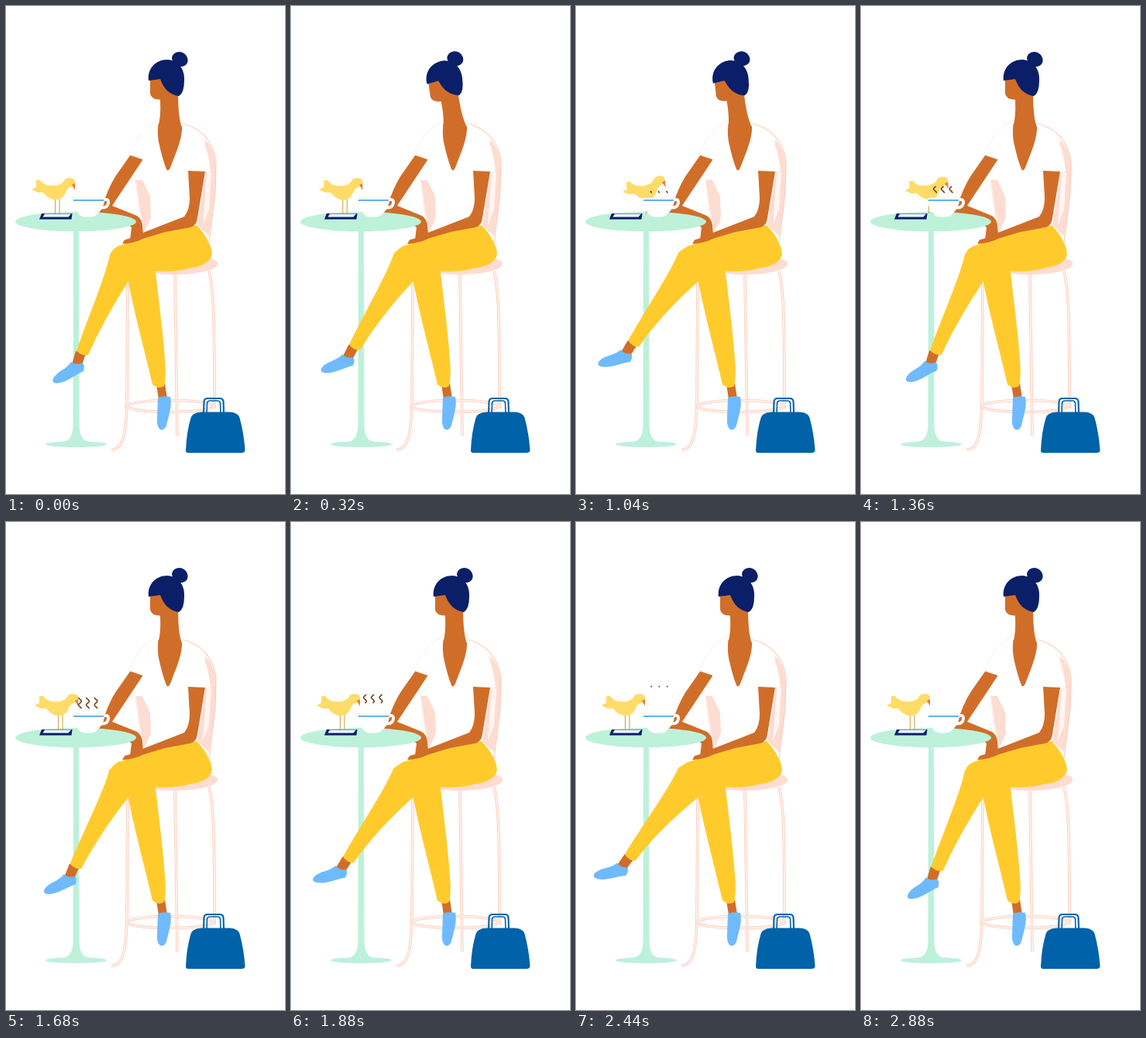
These frames come from a looping animation (360x628 px, 2.92 s). An HTML page with a canvas:

```html
<!DOCTYPE html>
<html lang="en">
<head>
<meta charset="utf-8">
<title>Coffee break</title>
<style>
html, body { margin: 0; width: 100%; height: 100%; overflow: hidden; background: #fff; }
canvas { display: block; width: 360px; height: 628px; }
</style>
</head>
<body>
<canvas id="stage"></canvas>
<script>
const W = 360, H = 628, LOOP = 2920;
const SKIN = '#d06e29', HAIR = '#0a1f68', PANTS = '#ffcb2c', SHOE = '#6fbaff';
const PINK = '#fddcd1', EDGE = '#fbcdbd', MINT = '#bdf1da', BIRD = '#ffdb68';

const canvas = document.getElementById('stage');
const ratio = window.devicePixelRatio || 1;
canvas.width = W * ratio;
canvas.height = H * ratio;
const ctx = canvas.getContext('2d');

function fill(d, color) {
  ctx.fillStyle = color;
  ctx.fill(new Path2D(d));
}

function line(d, color, width) {
  ctx.strokeStyle = color;
  ctx.lineWidth = width;
  ctx.stroke(new Path2D(d));
}

function oval(x, y, rx, ry, color) {
  ctx.fillStyle = color;
  ctx.beginPath();
  ctx.ellipse(x, y, rx, ry, 0, 0, Math.PI * 2);
  ctx.fill();
}

function turned(x, y, deg, draw) {
  ctx.save();
  ctx.translate(x, y);
  ctx.rotate(deg * Math.PI / 180);
  ctx.translate(-x, -y);
  draw();
  ctx.restore();
}

// Returns a function that rotates a point about a pivot, as path text
function spinner(px, py, deg) {
  const c = Math.cos(deg * Math.PI / 180), s = Math.sin(deg * Math.PI / 180);
  return (x, y) => {
    const dx = x - px, dy = y - py;
    return `${px + dx * c - dy * s} ${py + dx * s + dy * c} `;
  };
}

// Sine ease from 0 to 1 between two times
function ease(t, from, to) {
  const u = Math.min(1, Math.max(0, (t - from) / (to - from)));
  return (1 - Math.cos(Math.PI * u)) / 2;
}

function rod(d) {
  line(d, EDGE, 3.6);
  line(d, '#fff3ee', 1.8);
}

function chair() {
  fill('M257 172 C267 182 271 196 271 212 L269 250 L262 296 L247 282 L258 213 Z', PINK);
  fill('M259 214 L265 214 L262 262 L254 282 Z', '#fff5f1');
  fill('M168 224 L176 224 L188 246 L188 276 L179 291 L173 262 Z', PINK);
  line('M167 222 L172 262 L178 291 M165 180 C172 166 182 153 196 148', '#fde6de', 1);
  line('M226 151 C250 156 267 172 271 200 L270 240 L262 305', EDGE, 1.2);
  rod('M157 350 L156 510 C155 545 153 571 136 571');
  rod('M218 345 L221 553');
  rod('M262 341 C268 365 269 400 269 518');
  rod('M156 515 A56 7.5 0 1 1 268 515 A56 7.5 0 1 1 156 515');
  fill('M186 336 C186 322 268 318 273 330 C277 345 210 349 186 343 Z', PINK);
}

function farArm() {
  fill('M161 191 L177 197 L137 257 L169 270 Q175 274 176 282 L177 294 L160 301 L162 285 L150 275 L120 266 L128 247 Q136 225 147 211 Z', SKIN);
}

function table() {
  fill('M87 286 L94 286 L94.5 540 C95 556 101 560 110 562 L71 562 C80 560 86 556 86.5 540 Z', MINT);
  oval(90.5, 564, 39.5, 3.8, MINT);
  oval(90, 277.5, 78, 12.7, MINT);
  fill('M46 267 L85.5 267 L84.5 274.5 L43 274.5 Z', HAIR);
  fill('M50 267.5 L84 267.5 L80.5 271.5 L47.5 271.5 Z', '#f4fbff');
}

function standingLeg() {
  fill('M194 487 L205 486 L208 505 L197 506 Z', SKIN);
  fill('M196 504 Q203 501 212 503 C215 515 209 530 207 540 Q204 547 199 545 Q194 541 195 530 Z', SHOE);
  fill('M156 345 C164 390 178 440 189 487 Q197 494 204 489 Q207 478 205 455 C203 425 198 385 192 335 Z', PANTS);
}

function swingLeg(p) {
  const deg = 17.3 * p;
  const at = spinner(150, 310, deg);
  turned(150, 310, deg, () => {
    turned(96, 453, 7 * p, () => {
      fill('M90 444 L103 447 L98 462 L85 461 Z', SKIN);
      fill('M84 458 Q91 463 99 459 Q102 464 100 470 C90 474 80 483 69 485 Q58 487 61 479 C67 469 78 468 84 458 Z', SHOE);
    });
  });
  // The hem swings while the crook of the knee stays put
  fill('M' + at(134, 320) + 'C' + at(128, 350) + at(104, 405) + at(91, 444) +
    'Q' + at(98, 451) + at(106, 449) + 'Q' + at(126, 404) + '158 354 L160 320 L146 308 Z', PANTS);
  fill('M134 321 Q137 311 148 308 L178 296 L205 288 L246 282 Q256 292 262 305 Q269 320 263 326 Q256 335 238 337 C220 342 205 342 192 341 L158 354 Q140 340 134 321 Z', PANTS);
}

function shirt() {
  fill('M196 147 Q178 156 168 173 L158 191 L176 197 L176 224 L186 245 L187 272 L178 292 L215 288 L246 280 L257 214 L264 213 Q261 184 252 168 Q243 157 224 150 Z', '#fff');
  line('M196 147 Q178 156 168 173 L158 191 L176 197 M257 214 L264 213 Q261 184 252 168', '#fdebe4', 0.8);
  fill('M196.5 152 Q195 164 197 175 Q202 198 207 210 Q209 214 212 208 L217 195 Q228 168 227 155 Z', SKIN);
}

function head(deg) {
  const at = spinner(212, 160, deg);
  fill('M' + at(199, 112) + 'L' + at(199, 122) + 'Q' + at(200, 142) + '196.5 154 L227 156 Q' +
    at(222, 144) + at(222, 110) + 'Z', SKIN);
  turned(212, 160, deg, () => {
    fill('M186 92 L186 113 Q188 121 200 120.5 L222 116 L208 84 Z', SKIN);
    fill('M184 96 C182 80 194 69 208 69 C224 70 231 83 230 96 Q230 112 223 116 C211 114 204 107 199 94 Z', HAIR);
    fill('M214 67 C215 59 226 56 232 63 C238 71 233 79 224 78 Q215 78 214 67 Z', HAIR);
  });
}

function nearArm() {
  fill('M235 212 L257 213 L247 273 Q246 283 237 285 L205 291 L178 299 Q164 306 150 306 L153 301 L163 298 L166 291 L176 292 L230 271 Q237 262 237 247 Z', SKIN);
}

function bird(t) {
  const hop = ease(t, 80, 1160) - ease(t, 1200, 1840);
  const nod = ease(t, 250, 640) - ease(t, 700, 860);
  const rise = ease(t, 740, 1040) - ease(t, 1200, 1520);
  ctx.save();
  ctx.translate(28 * hop, 3 * nod);
  line('M63.5 248 L63.5 267 M69 248 L69 267', '#cfa64e', 1.1);
  turned(60, 238, 3 * nod - 7 * rise, () => {
    fill('M33 236 L39 233 L39 224 L44 224 Q49 231 57 231 C67 232 73 229 76 223 Q82 219 88 223 Q91 229 86 232 Q78 234 76 242 Q72 250 62 249.5 Q53 247 48 240 L41 240 Z', BIRD);
    fill('M85 230 L89 228 L89 237 Z', '#ee7a35');
  });
  ctx.restore();
}

function cup() {
  line('M125 250 Q133 247 132 254 Q130 261 122 259', '#ece5e1', 4);
  line('M125 250 Q133 247 132 254 Q130 261 122 259', '#fff', 2.8);
  fill('M86 247 L127 247 C127 258 123 263 119 266 Q116 271 110 271.5 L102 271.5 Q95 271 92 265 Q86 259 86 247 Z', '#fff');
  line('M86 247 L127 247', '#e9e5e2', 0.7);
  line('M87 250 L126 250', '#62b0f4', 1.8);
}

function steam(t) {
  if (t < 960 || t > 2480) return;
  const top = 239.8 - (t - 960) * 0.0195;
  const low = Math.max(top + 1.8, 241 - 30 * ease(t, 1590, 2440));
  ctx.strokeStyle = '#78481f';
  ctx.lineWidth = 1.7;
  for (const x of [95.5, 105.5, 116]) {
    ctx.beginPath();
    for (let y = top; y <= low; y += 0.4) {
      ctx.lineTo(x + 1.8 * Math.cos((y - 240.2) / 9.6 * Math.PI * 2), y);
    }
    ctx.stroke();
  }
}

function bag() {
  const blue = '#0062a8';
  line('M255 525 L255.5 509 Q256 505 260 505 L276 505 Q280 505 280.5 509 L281 525', blue, 2.1);
  line('M259 525 L259.5 511 Q260 508 263 508 L273 508 Q276 508 276.5 511 L277 525', blue, 1.6);
  fill('M238.5 530 Q240 523.5 252 522.5 L289 522.5 Q300 523.5 301.5 530 Q307 550 308.5 572 Q308 575 304 575 L235 575 Q232 575 232 572 Q233 548 238.5 530 Z', blue);
}

function render(t) {
  ctx.setTransform(ratio, 0, 0, ratio, 0, 0);
  ctx.fillStyle = '#fff';
  ctx.fillRect(0, 0, W, H);
  const swing = (1 - Math.cos(t / LOOP * Math.PI * 4)) / 2;
  const bow = ease(t, 40, 600) - ease(t, 720, 1300);
  chair();
  farArm();
  table();
  standingLeg();
  swingLeg(swing);
  shirt();
  head(-15.5 * bow);
  nearArm();
  bird(t);
  cup();
  steam(t);
  bag();
}

const start = performance.now();
function tick() {
  render((performance.now() - start) % LOOP);
  requestAnimationFrame(tick);
}
tick();
</script>
</body>
</html>
```
